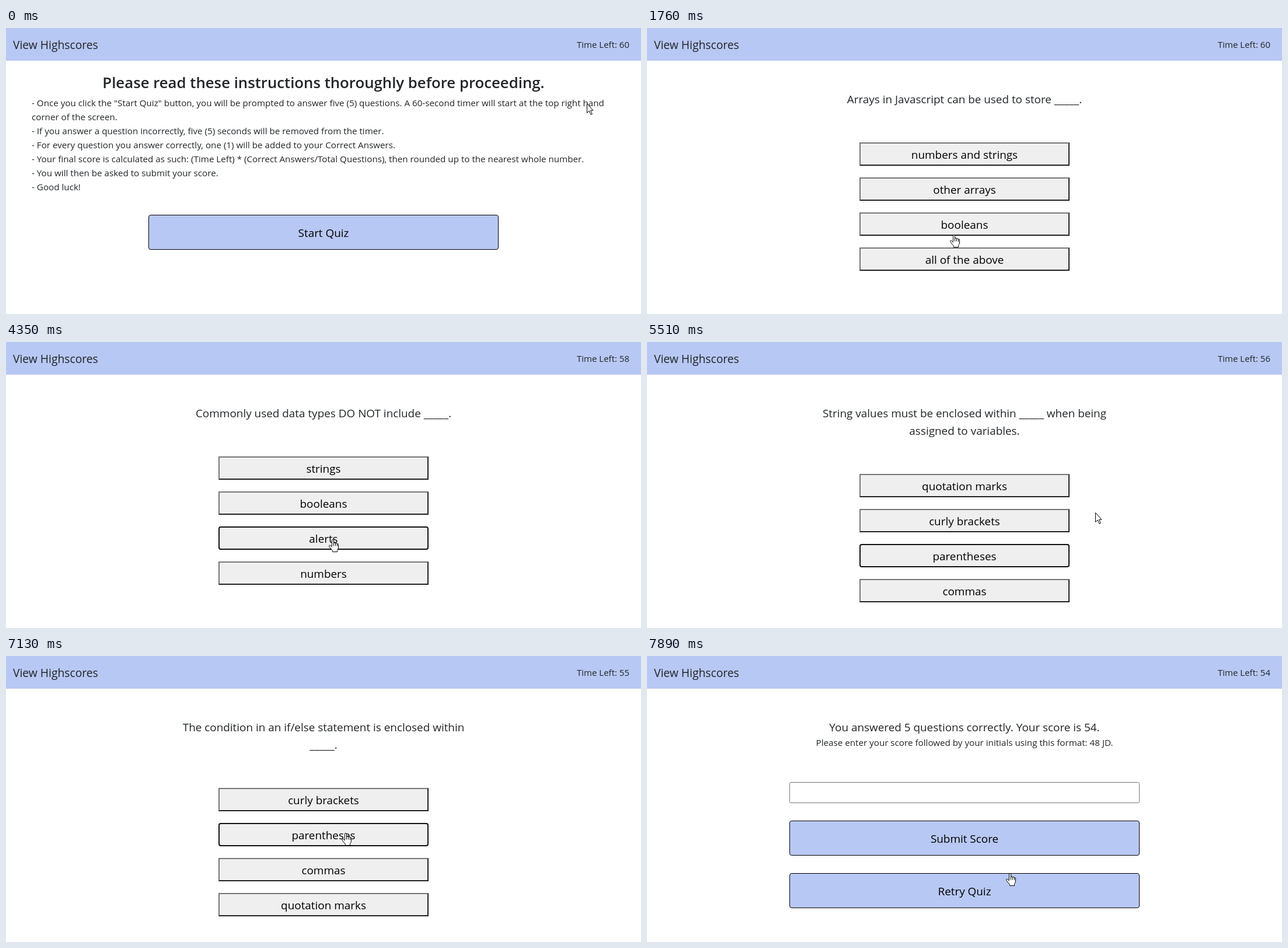
An HTML page for the animation above (7990 ms loop, 1088 px wide and 490 px high).

```html
<!DOCTYPE html>
<html lang="en">
<head>
<meta charset="utf-8">
<title>Quiz</title>
<style>
html, body { margin: 0; width: 100%; height: 100%; overflow: hidden; background: #fff; }
svg { display: block; font-family: "Open Sans", "Noto Sans", sans-serif; fill: #212529; }
</style>
</head>
<body>
<svg width="1088" height="490" viewBox="0 0 1088 490"><g id="page"></g><g id="cursor"></g></svg>
<script>
const LOOP = 7990, END = 7785, TICK = 963, CLICK = 190, STEP = 96.7, GLIDE = 500;
const BLUE = '#b8c8f4', BIG = 18.9, SMALL = 15.2;
const page = document.getElementById('page'), cursor = document.getElementById('cursor');

const intro = [
  '- Once you click the "Start Quiz" button, you will be prompted to answer five (5) questions. A 60-second timer will start at the top right hand',
  'corner of the screen.',
  '- If you answer a question incorrectly, five (5) seconds will be removed from the timer.',
  '- For every question you answer correctly, one (1) will be added to your Correct Answers.',
  '- Your final score is calculated as such: (Time Left) * (Correct Answers/Total Questions), then rounded up to the nearest whole number.',
  '- You will then be asked to submit your score.',
  '- Good luck!'
];
const quiz = [
  { at: 1655, answer: 3, ask: ['Arrays in Javascript can be used to store _____.'],
    options: ['numbers and strings', 'other arrays', 'booleans', 'all of the above'] },
  { at: 3575, answer: 2, ask: ['Commonly used data types DO NOT include _____.'],
    options: ['strings', 'booleans', 'alerts', 'numbers'] },
  { at: 4535, answer: 0, ask: ['String values must be enclosed within _____ when being', 'assigned to variables.'],
    options: ['quotation marks', 'curly brackets', 'parentheses', 'commas'] },
  { at: 6560, answer: 1, ask: ['The condition in an if/else statement is enclosed within', '_____.'],
    options: ['curly brackets', 'parentheses', 'commas', 'quotation marks'] },
  { at: 7225, answer: 2, ask: ['A very useful tool used during development and debugging', 'for printing content to the debugger is _____.'],
    options: ['JavaScript', 'terminal/bash', 'console.log', 'for loops'] }
];

// where the pointer rests: arrival time and place of its tip
const stops = [
  [180, 995, 129], [190, 593, 150], [690, 593, 150], [700, 640, 242], [1090, 717, 378], [1480, 525, 354],
  [2250, 640, 380], [3390, 572, 389], [4250, 559, 338], [5110, 929, 262], [5505, 768, 292],
  [6080, 576, 246], [6940, 581, 303], [7800, 621, 372]
];

const ARROW = 'M.5.5V16.5L4.2 13 7 19.5 9.3 18.5 6.6 12.2H11Z';
const HAND = 'M-.5 12V2Q-.5.5 1 .5T2.5 2V7.5Q2.5 5.8 4 5.8T5.5 7.5V8Q5.5 6.6 7 6.6T8.5 8V9Q8.5 7.6 9.7 7.8T10.5 9V14' +
  'Q10.5 16.5 8.5 18.5V21.5H.5V19.5L-4 14Q-6.5 10.5-4.5 10.2-2.5 10-.5 13.5M2.5 7V11.5M5.5 8V11.5M8.5 9V12';

const text = (x, y, str, size = BIG, anchor = 'middle', extra = '') =>
  `<text x="${x}" y="${y}" font-size="${size}" text-anchor="${anchor}" ${extra}>${str}</text>`;
const rect = (x, y, w, h, style) => `<rect x="${x}" y="${y}" width="${w}" height="${h}" ${style}/>`;
const label = (y, str) => text(544, y, str, BIG, 'middle', 'fill="#000"');

const bigButton = (y, str) =>
  rect(244.5, y + .5, 599, 59, `rx="3.5" fill="${BLUE}" stroke="#000"`) + label(y + 38, str);

function option(y, str, focused) {
  const box = focused
    ? rect(365, y + 1, 358, 38, 'rx="3" fill="#efefef" stroke="#101010" stroke-width="2"')
    : rect(364, y, 360, 40, 'fill="#212121"') +
      `<path fill="#767676" d="M364 ${y}h360l-2 2L366 ${y + 38}l-2 2z"/>` +
      rect(366, y + 2, 356, 36, 'fill="#efefef"');
  return box + label(y + 28, str);
}

const introPage = () => ({
  html: text(544, 103, 'Please read these instructions thoroughly before proceeding.', 25.75, 'middle', 'font-weight="600"') +
    intro.map((line, i) => text(44, 134 + 24 * i, line, SMALL, 'start')).join('') + bigButton(320, 'Start Quiz'),
  hits: [[244, 320, 600, 60]]
});

function quizPage(n, t) {
  const { ask, options, answer } = quiz[n];
  const top = 166 + 30 * ask.length;
  const next = n + 1 < quiz.length ? quiz[n + 1].at : END;
  // the last clicked option keeps its focus ring on the following question
  const focus = t >= next - CLICK ? answer : n ? quiz[n - 1].answer : -1;
  return {
    html: ask.map((line, i) => text(544, 129 + 30 * i, line)).join('') +
      options.map((str, i) => option(top + 60 * i, str, i === focus)).join(''),
    hits: options.map((_, i) => [364, top + 60 * i, 360, 40])
  };
}

const endPage = () => ({
  html: text(544, 129, 'You answered 5 questions correctly. Your score is 54.') +
    text(544, 154, 'Please enter your score followed by your initials using this format: 48 JD.', SMALL) +
    rect(244.5, 216.5, 599, 35, 'rx="2" fill="#fff" stroke="#767676"') +
    bigButton(282, 'Submit Score') + bigButton(372, 'Retry Quiz'),
  hits: [[244, 282, 600, 60], [244, 372, 600, 60]]
});

function header(t) {
  const left = 60 - Math.max(0, Math.floor((t - quiz[0].at) / TICK + .005));
  return rect(0, 0, 1088, 56, `fill="${BLUE}"`) + text(12, 36, 'View Highscores', 19.3, 'start') +
    text(1068, 34, 'Time Left: ' + left, 15, 'end');
}

function pointer(t) {
  const i = stops.findIndex(s => s[0] > t);
  if (i < 1) return stops.at(i).slice(1);
  const [t0, x0, y0] = stops[i - 1], [t1, x1, y1] = stops[i];
  const start = Math.max(t0, t1 - GLIDE);
  const f = Math.max(0, (t - start) / (t1 - start));
  const ease = f * f * (3 - 2 * f);
  return [Math.round(x0 + (x1 - x0) * ease), Math.round(y0 + (y1 - y0) * ease)];
}

let shown = '';
function draw() {
  const t = performance.now() % LOOP;
  const n = quiz.filter(q => t >= q.at).length - 1;
  const { html, hits } = n < 0 ? introPage() : t < END ? quizPage(n, t) : endPage();
  const full = header(t) + html;
  if (full !== shown) page.innerHTML = shown = full;

  const [x, y] = pointer(Math.floor((t + 10) / STEP) * STEP);
  const over = hits.some(([l, top, w, h]) => x >= l && x < l + w && y >= top && y < top + h);
  const hidden = t >= 495 && t < 695;
  cursor.innerHTML = hidden ? '' :
    `<path transform="translate(${x} ${y})" d="${over ? HAND : ARROW}" fill="#fff" stroke="#000" stroke-linejoin="round"/>`;
  requestAnimationFrame(draw);
}
draw();
</script>
</body>
</html>
```
